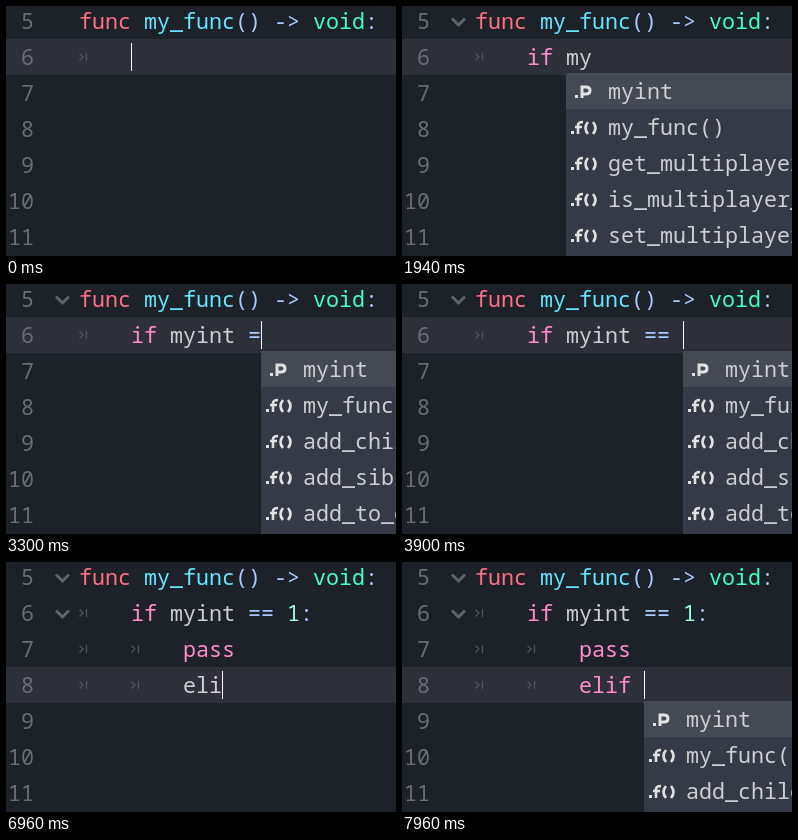
An HTML page with a canvas that plays this animation: 390 by 250 pixels, repeating every 8 s.

```html
<!DOCTYPE html>
<html>
<head>
<meta charset="utf-8">
<style>
html, body { margin: 0; width: 100%; height: 100%; overflow: hidden; background: #1d2229; }
canvas { display: block; }
</style>
</head>
<body>
<canvas id="stage" width="390" height="250"></canvas>
<script>
const ctx = document.getElementById('stage').getContext('2d');
const LOOP = 8000, CHAR = 13, ROW = 36, LEFT = 73;
const FONT = '21.667px "Noto Sans Mono", "DejaVu Sans Mono", monospace';

// [time, inserted text]
const keys = [
  [530, 'i'], [870, 'f'], [1000, ' '], [1190, 'm'], [1470, 'y'], [2280, 'int'],
  [2810, ' '], [3010, '='], [3510, '='], [3900, ' '], [3950, '1'], [4350, ':\n'],
  [5440, 'p'], [5630, 'a'], [5840, 's'], [5970, 's'], [6090, '\n'],
  [6620, 'e'], [6750, 'l'], [6960, 'i'], [7490, 'f'], [7960, ' ']
];
const caretOff = [[1940, 2410], [3440, 3510], [4490, 4960], [6500, 6620], [7430, 7490]];
const folds = [[660, 0], [5570, 1]]; // [time, row]

const all = ['myint', 'my_func()', 'add_child()', 'add_sibling()', 'add_to_group()'];
const my = ['myint', 'my_func()', 'get_multiplayer()', 'is_multiplayer_authority()', 'set_multiplayer_authority()'];
const eli = ['elif', 'get_child_in()', 'set_editable_instance()'];
// [from, to, x, row, items]
const popups = [
  [1740, 2280, 164, 1, my], [3300, 3510, 255, 1, all], [3510, 3900, 268, 1, all],
  [3900, 3950, 281, 1, all], [7290, 7960, 177, 3, eli], [7960, 8000, 242, 3, all]
];

const colors = {
  func: '#ff7085', my_func: '#66e6ff', void: '#42ffc2',
  if: '#ff8ccc', elif: '#ff8ccc', pass: '#ff8ccc', 1: '#a1ffe0'
};
const colorOf = token => colors[token] || (/\w/.test(token) ? '#cdcfd2' : '#abc9ff');
const within = (t, [from, to]) => t >= from && t < to;

function write(text, x, y, color) {
  ctx.fillStyle = color;
  [...text].forEach((c, i) => ctx.fillText(c, x + i * CHAR, y));
}

function writeCode(text, x, y) {
  for (const m of text.matchAll(/\w+|[^\w\s]+/g))
    write(m[0], x + m.index * CHAR, y, colorOf(m[0]));
}

function stroke(path, x, y, color, width) {
  ctx.save();
  ctx.translate(x, y);
  ctx.strokeStyle = color;
  ctx.lineWidth = width;
  ctx.stroke(new Path2D(path));
  ctx.restore();
}

function drawPopup([, , x, row, items]) {
  const top = 31 + row * ROW;
  ctx.fillStyle = '#353a46';
  ctx.fillRect(x, top, 390 - x, 250 - top);
  ctx.fillStyle = '#454953';
  ctx.fillRect(x, top, 390 - x, ROW);
  items.forEach((item, i) => {
    const y = top + i * ROW, method = item.endsWith('()');
    if (item !== 'elif') {
      ctx.fillStyle = '#e0e0e0';
      ctx.fillRect(x + (method ? 5 : 9), y + 22, 3, 3);
      stroke(method
        ? 'M12 25V16Q12 13 17 13M9 18H16M22 13Q17 19 22 25M27 13Q32 19 27 25'
        : 'M16 25V14H20Q24 14 24 17.5T20 21H16', x, y, '#e0e0e0', method ? 2.6 : 3);
    }
    write(item, x + 42, y + 26, '#cdcfd2');
  });
}

function draw(t) {
  const typed = keys.filter(k => k[0] <= t).map(k => k[1]).join('').split('\n');
  const last = typed.length;
  ctx.fillStyle = '#1d2229';
  ctx.fillRect(0, 0, 390, 250);
  ctx.fillStyle = '#2d3038';
  ctx.fillRect(0, last * ROW - 3, 390, ROW);

  ctx.font = FONT;
  for (let i = 0; i < 7; i++) write(String(i + 5).padStart(2), 2, 23 + i * ROW, '#6a6e74');
  writeCode('func my_func() -> void:', LEFT, 23);

  typed.forEach((line, i) => {
    const row = i + 1, indent = Math.min(row, 2);
    for (let k = 0; k < indent; k++)
      stroke('M0.5 1L4 4.5L0.5 8M7.5 0.5V8.5', LEFT + k * 4 * CHAR, row * ROW + 10.5, '#50545b', 1.3);
    const x = LEFT + indent * 4 * CHAR;
    writeCode(line, x, 23 + row * ROW);
    if (row === last && !caretOff.some(span => within(t, span))) {
      ctx.fillStyle = '#fff';
      ctx.fillRect(x + line.length * CHAR, 1 + row * ROW, 1, 28);
    }
  });

  for (const [from, row] of folds)
    if (t >= from) stroke('M50 12.5L56.5 19L63 12.5', 0, row * ROW, '#606367', 3);
  popups.filter(p => within(t, p)).forEach(drawPopup);
}

const start = performance.now();
function tick() {
  draw((performance.now() - start) % LOOP);
  requestAnimationFrame(tick);
}
tick();
</script>
</body>
</html>
```
